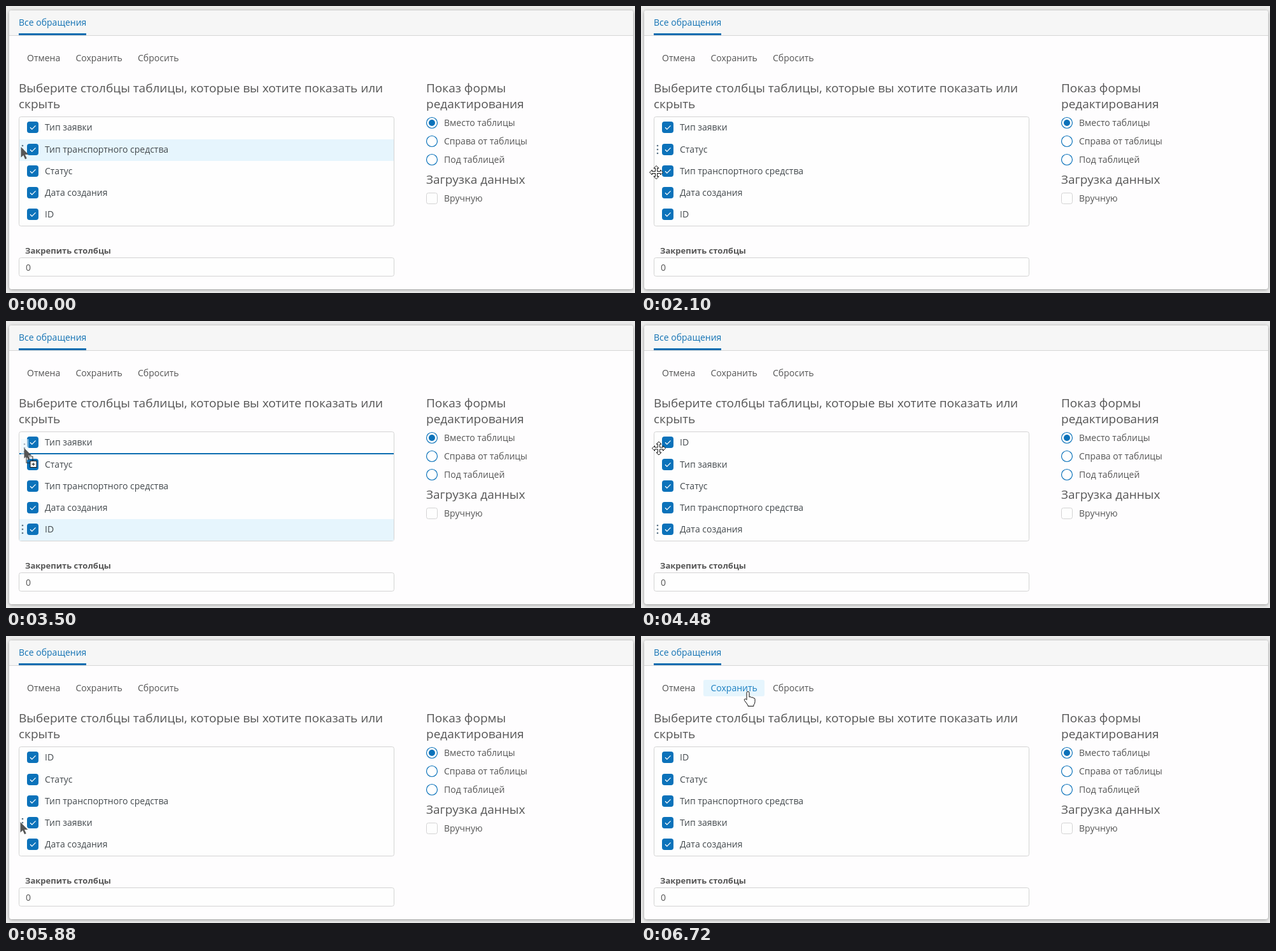
Animation of 988 by 452 pixels, one loop 7000 ms. Source, as an HTML page:

```html
<!DOCTYPE html>
<html lang="ru">
<head>
<meta charset="utf-8">
<title>Настройка столбцов</title>
<style>
  html, body { margin: 0; width: 100%; height: 100%; overflow: hidden; background: #ebebeb; }
  svg { display: block; width: 988px; height: 452px; font: 14px "Open Sans", "Noto Sans", sans-serif; fill: #555; }
  .panel { fill: #fefdfe; filter: drop-shadow(0 1px 2.5px rgba(0, 0, 0, .36)); }
  .head { font-size: 19px; }
  .label { font-size: 13px; font-weight: 700; }
  .blue { fill: #1272b4; }
  .box { fill: #fefefe; stroke: #d3d3d3; }
  .row { fill: #444a4e; }
  .check { fill: #0b72ba; }
  .tick { fill: none; stroke: #fff; stroke-width: 1.3; }
  .ring { fill: #fefefe; stroke: #0b72ba; stroke-width: 1.2; }
  .hot { fill: #e6f5fd; }
  .dots { fill: #5a7486; }
  .cursor path { fill: #fff; stroke: #111; stroke-width: 1; stroke-linejoin: round; }
</style>
</head>
<body>
<svg viewBox="0 0 988 452">
  <defs>
    <path id="arrow" d="M0 0V16.5L3.8 13 6.6 19.2 9.2 18 6.4 12H11.8Z"/>
    <g id="dots"><circle cy="-6" r="1.35"/><circle r="1.35"/><circle cy="6" r="1.35"/></g>
  </defs>

  <rect class="panel" x="5" y="7" width="980" height="439" rx="4"/>
  <path d="M5 46V11a4 4 0 0 1 4-4H981a4 4 0 0 1 4 4V46Z" fill="#f6f6f6"/>
  <path d="M5 46.5H985" stroke="#d6d6d6"/>
  <text class="blue" x="20" y="31">Все обращения</text>
  <rect x="20" y="43" width="106" height="3" fill="#0b6cb0"/>

  <rect id="saveBg" class="hot" x="98" y="69" width="96" height="26" rx="3"/>
  <text x="33" y="87">Отмена</text>
  <text id="save" x="109.5" y="87">Сохранить</text>
  <text x="207" y="87">Сбросить</text>

  <g class="head">
    <text x="20" y="136">Выберите столбцы таблицы, которые вы хотите показать или</text>
    <text x="20" y="161">скрыть</text>
    <text x="660" y="136">Показ формы</text>
    <text x="660" y="161">редактирования</text>
    <text x="660" y="280">Загрузка данных</text>
  </g>

  <rect class="box" x="20.5" y="174.5" width="589" height="172" rx="3"/>
  <rect id="hover" class="hot" x="21" width="588" height="34"/>
  <use id="handle" class="dots" href="#dots"/>
  <g id="rows"></g>
  <rect id="line" x="21" width="588" height="2" fill="#0b6cb0"/>

  <text class="label" x="30" y="390">Закрепить столбцы</text>
  <rect class="box" x="20.5" y="396.5" width="589" height="29" rx="3"/>
  <text x="31" y="417">0</text>

  <g id="radios"></g>
  <rect class="box" x="660.5" y="294.5" width="17" height="17" rx="3"/>
  <text x="688" y="308">Вручную</text>

  <g class="cursor">
    <use id="c-arrow" href="#arrow"/>
    <path id="c-move" d="M0-10.5L4-6.5H1.5V-1.5H6.5V-4L10.5 0 6.5 4V1.5H1.5V6.5H4L0 10.5-4 6.5H-1.5V1.5H-6.5V4L-10.5 0-6.5-4V-1.5H-1.5V-6.5H-4Z"/>
    <path id="c-hand" d="M-2 13V2a2 2 0 0 1 4 0V8.5q3-1 3.5 1 3-1 3.5 1 2-.5 2 1.5V16q0 3-2 5v2H0v-1.5L-5.5 14q-1-2 1-2.5 1.5 0 2.5 1.5Z"/>
    <g id="c-drag">
      <g opacity=".55">
        <rect class="hot" x="-5" y="-14" width="12" height="24"/>
        <use class="dots" href="#dots" x=".5"/>
      </g>
      <rect x="3.5" y="13.5" width="10" height="10" fill="none" stroke="#222" stroke-width="2" stroke-dasharray="1 1"/>
      <use href="#arrow"/>
      <rect x="9.5" y="20.5" width="10" height="10" fill="#fff" stroke="#111"/>
      <path d="M12 25.5H17M14.5 23V28"/>
    </g>
  </g>
</svg>
<script>
  const $ = id => document.getElementById(id);
  const LOOP = 7000;
  const columns = {
    A: 'Тип заявки', B: 'Тип транспортного средства', C: 'Статус', D: 'Дата создания', E: 'ID'
  };
  const rowY = i => i ? 192 + 34 * i : 191;

  // Each step overrides the previous state: [time, cursor, x, y, changes]
  const steps = [
    [0, 'arrow', 23.5, 222, { order: 'ABCDE', hover: 1, dots: 1, line: 0 }],
    [280, 'move', 24, 228],
    [840, 'drag', 24, 234],
    [980, 'drag', 24, 245],
    [1120, 'drag', 25, 256, { line: 276 }],
    [1260, 'drag', 24.5, 261],
    [2100, 'move', 24, 262, { order: 'ACBDE', hover: -1, line: 0 }],
    [2240, 'arrow', 23, 292, { hover: 3, dots: 3 }],
    [2380, 'arrow', 22.5, 325, { hover: 4, dots: 4 }],
    [2520, 'move', 23, 328],
    [2800, 'move', 22, 329],
    [2940, 'move', 21, 328],
    [3080, 'move', 21, 329],
    [3360, 'drag', 24, 262, { line: 276 }],
    [3500, 'drag', 28.5, 200, { line: 208 }],
    [4480, 'move', 28, 200.5, { order: 'EACBD', hover: -1, line: 0 }],
    [4620, 'arrow', 26, 214, { hover: 1, dots: 1 }],
    [4760, 'move', 23, 226],
    [4900, 'move', 23, 228],
    [5040, 'drag', 24, 240],
    [5180, 'drag', 25, 268, { line: 276 }],
    [5320, 'drag', 28, 295, { line: 310 }],
    [5600, 'move', 28, 296, { order: 'ECBAD', hover: -1, line: 0 }],
    [5740, 'arrow', 25, 294, { dots: 3 }],
    [5880, 'arrow', 22.5, 293],
    [6020, 'arrow', 23, 292, { hover: 3 }],
    [6160, 'arrow', 24, 291],
    [6440, 'arrow', 70, 210, { hover: 1, dots: 1 }],
    [6580, 'arrow', 130, 130, { hover: -1, dots: -1 }],
    [6720, 'hand', 168, 87.5]
  ];
  let last = {};
  const states = steps.map(([time, cursor, x, y, changes]) =>
    last = { ...last, time, cursor, x, y, ...changes });

  for (const [key, name] of Object.entries(columns)) {
    $('rows').innerHTML += `<g id="row${key}" class="row">
      <rect class="check" x="33" y="-9" width="18" height="18" rx="4"/>
      <path class="tick" d="M38 .3L40.8 3.1 46.5-2.6"/>
      <text x="61" y="5">${name}</text></g>`;
  }
  ['Вместо таблицы', 'Справа от таблицы', 'Под таблицей'].forEach((name, i) => {
    const y = 184 + 29 * i;
    $('radios').innerHTML += `<circle class="ring" cx="669" cy="${y}" r="8.5"/>
      ${i ? '' : `<circle class="check" cx="669" cy="${y}" r="5"/>`}
      <text x="688" y="${y + 5}">${name}</text>`;
  });

  const show = (el, on) => el.style.display = on ? '' : 'none';
  const place = (el, x, y) => el.setAttribute('transform', `translate(${x} ${y})`);

  function draw(s) {
    [...s.order].forEach((key, i) => place($('row' + key), 0, rowY(i)));
    show($('hover'), s.hover >= 0);
    $('hover').setAttribute('y', 176 + 34 * s.hover);
    show($('handle'), s.dots >= 0);
    place($('handle'), 26, rowY(s.dots));
    show($('line'), s.line);
    $('line').setAttribute('y', s.line);
    for (const kind of ['arrow', 'move', 'drag', 'hand']) {
      const el = $('c-' + kind);
      show(el, kind === s.cursor);
      place(el, s.x, s.y);
    }
    const onSave = s.cursor === 'hand';
    show($('saveBg'), onSave);
    $('save').style.fill = onSave ? '#1b7fc2' : '';
  }

  const start = performance.now();
  let shown;
  function tick() {
    const t = (performance.now() - start) % LOOP;
    const state = states.findLast(s => s.time <= t);
    if (state !== shown) draw(shown = state);
    requestAnimationFrame(tick);
  }
  tick();
</script>
</body>
</html>
```
